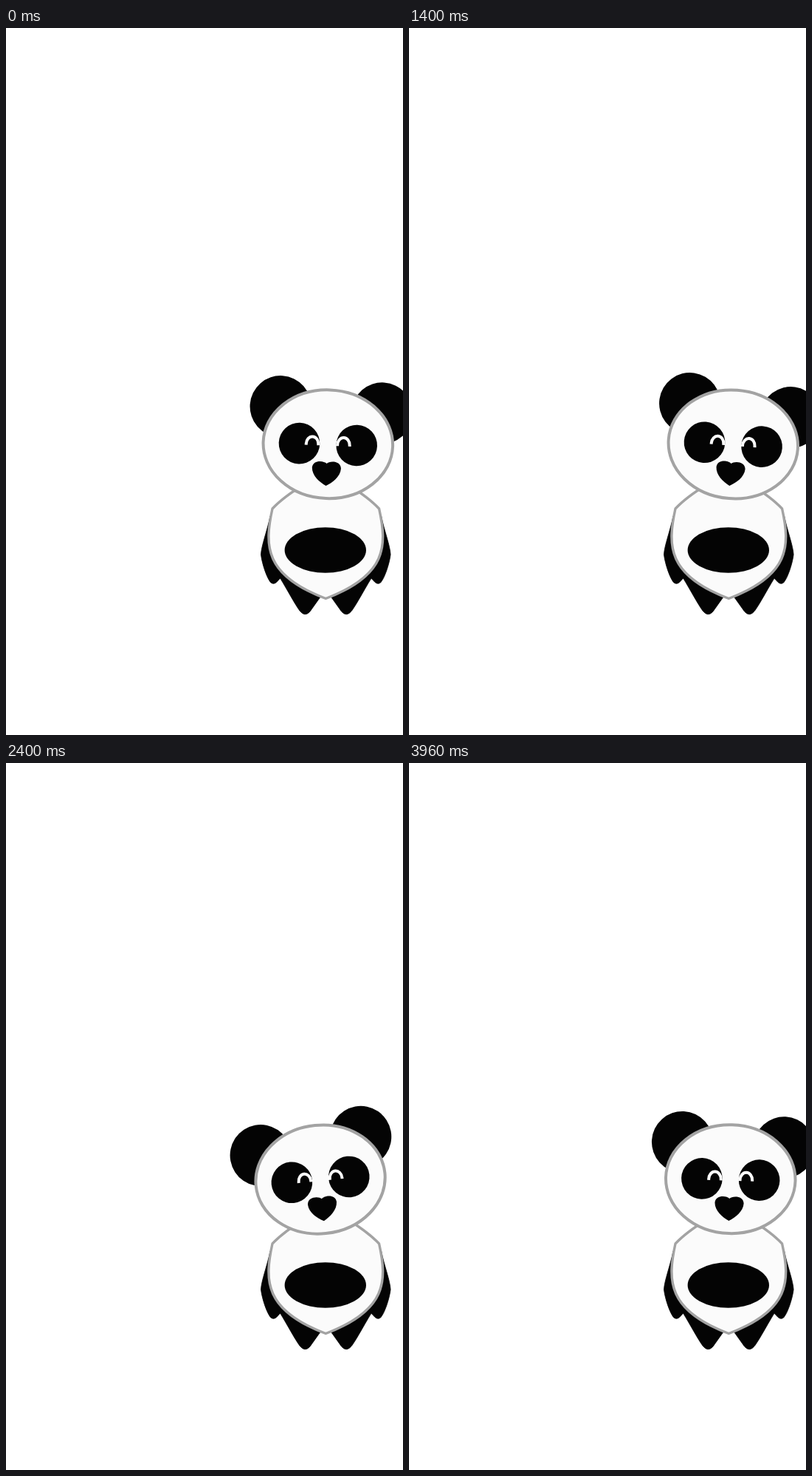
Write an HTML page that moves like this. It is 538x956 px and loops after 4 s.

```html
<!DOCTYPE html>
<html lang="en">
<head>
<meta charset="utf-8">
<title>Swaying panda</title>
<style>
  html, body { margin: 0; width: 100%; height: 100%; overflow: hidden; background: #fff; }
  svg { display: block; width: 100%; height: 100%; }
  .black { fill: #040404; }
  .fur { fill: #fbfbfb; stroke: #a3a3a3; stroke-linejoin: round; }
  .smile { fill: none; stroke: #fff; stroke-width: 4; }
  #limbs { stroke: #040404; stroke-width: .8; }
</style>
</head>
<body>
<svg viewBox="0 0 538 956">
  <defs>
    <g id="limbs" class="black">
      <path d="M358 660C354 680 346 700 345.5 712C347 725 354 745 359 750Q363 753 367 749L380 735Z"/>
      <path d="M366 735C380 757 390 777 398 788Q405 797 412 789L427 768L420 740Z"/>
    </g>
    <path id="smile" class="smile" d="M-8.3 0V-1.5A8.3 10 0 0 1 8.3 -1.5V0"/>
  </defs>

  <use href="#limbs"/>
  <use href="#limbs" transform="matrix(-1 0 0 1 866.6 0)"/>
  <path class="fur" stroke-width="3.4" d="M404 617Q375 635 361 650C350 700 350 740 433.3 771.5C516.6 740 516.6 700 505.6 650Q491.6 635 462.6 617Z"/>
  <ellipse class="black" cx="432.8" cy="706" rx="55.2" ry="30.8"/>

  <g id="ears" class="black">
    <circle cx="364.4" cy="516" r="41.5"/>
    <circle cx="502.4" cy="516" r="41.5"/>
  </g>

  <g id="head">
    <ellipse class="fur" stroke-width="4" cx="433.6" cy="562.7" rx="87.8" ry="73.4"/>
    <circle class="black" cx="394.7" cy="563" r="27.8"/>
    <circle class="black" cx="472.5" cy="563" r="27.8"/>
    <use href="#smile" x="412.3" y="564.7"/>
    <use href="#smile" x="454.7" y="564.7"/>
    <path class="black" d="M432.8 589C429 585 414 584 413.2 595C413.5 606 424 614.5 432.8 619C441.6 614.5 452 606 452.4 595C451.6 584 436.6 585 432.8 589Z"/>
  </g>
</svg>
<script>
  const LOOP = 4000, STEP = 40, PEAK = 812;
  const head = document.getElementById('head');
  const ears = document.getElementById('ears');
  const start = performance.now();

  function rotate(part, degrees, pivotY) {
    part.setAttribute('transform', `rotate(${degrees} 433.5 ${pivotY})`);
  }

  function draw() {
    const elapsed = performance.now() - start;
    const time = Math.floor(elapsed / STEP) * STEP % LOOP;
    const sway = Math.cos((time - PEAK) / LOOP * 2 * Math.PI);
    rotate(head, 7.2 * sway, 638);
    rotate(ears, 13.2 * sway, 628); // ears lean further than the head
    requestAnimationFrame(draw);
  }
  draw();
</script>
</body>
</html>
```
